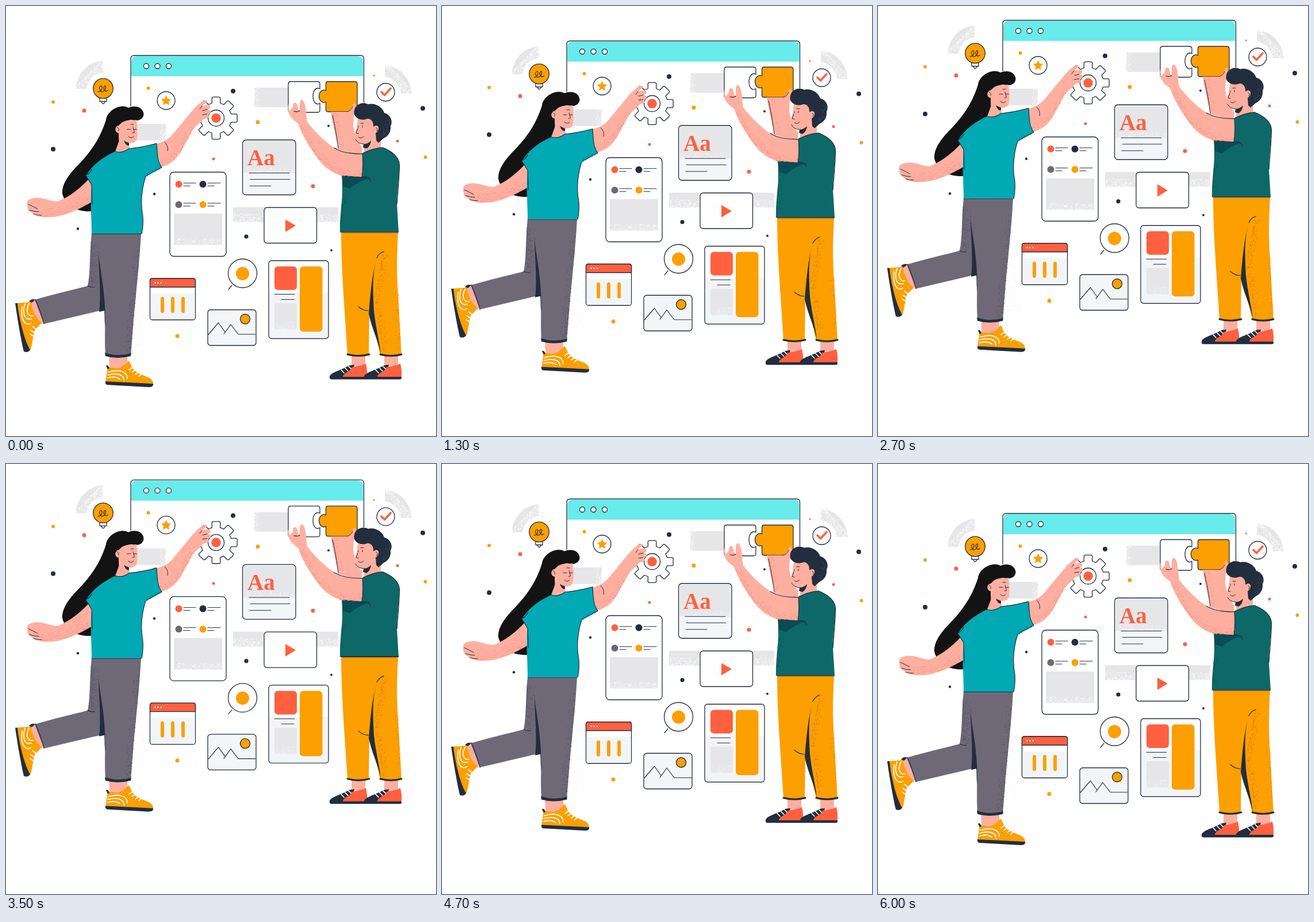
An HTML page for the animation above (6100 ms loop, 748 by 748 pixels).

```html
<!DOCTYPE html>
<html lang="en">
<head>
<meta charset="utf-8">
<title>Building a page together</title>
<style>
html, body { margin: 0; width: 100%; height: 100%; overflow: hidden; background: #fff; }
svg { display: block; width: 100vw; height: 100vh; }
path, rect, circle { stroke-linecap: round; stroke-linejoin: round; }
.ln { fill: none; stroke: #222d3e; stroke-width: 1.2; }
.thin { fill: none; stroke: #222d3e; stroke-width: 1; }
.box { fill: #fff; stroke: #222d3e; stroke-width: 1.3; }
.tint { fill: #f2f6f8; stroke: #222d3e; stroke-width: 1.3; }
.lace { fill: none; stroke: #fff; stroke-width: 1.7; }
.gray { fill: #e6e6e9; }
.pale { fill: #f2f5f8; }
.navy { fill: #222d3e; }
.red { fill: #ff6040; }
.gold { fill: #fc9f00; }
.skin { fill: #ffaf9f; }
.grain { fill: none; stroke-width: 1.1; }
</style>
</head>
<body>
<svg viewBox="0 0 748 748">
<g id="scene">

  <!-- browser window -->
  <path class="box" d="M217 174V92Q217 86 223 86H617Q622.500 86 622.500 92V168"/>
  <path fill="#67ebeb" d="M218 122V96Q219 87 228 87H612Q621 88 621.700 96V122Z"/>
  <g class="box"><circle cx="244" cy="104.500" r="4.500"/><circle cx="263.500" cy="104.500" r="4.500"/><circle cx="283" cy="104.500" r="4.500"/></g>

  <!-- textured backdrops -->
  <path class="gray" d="M168 95C142 98 124 116 121 144H140C142 128 152 118 168 116Z"/>
  <path class="grain" stroke="#fff" data-grain="118 144 167 94 16 260"/>
  <path class="gray" d="M659 103C684 104 704 126 706 152H687C686 138 675 125 659 123Z"/>
  <path class="grain" stroke="#fff" data-grain="663 100 710 152 16 260"/>
  <path class="gray" d="M432 142H492V176H432ZM222 205H278V234H222ZM395 350H578V376H395Z"/>
  <path class="grain" stroke="#fff" data-grain="432 176 432 142 9 60"/>
  <path class="grain" stroke="#fff" data-grain="278 204 278 235 10 60"/>
  <path class="grain" stroke="#fff" data-grain="578 377 395 377 16 620"/>
  <path class="grain" stroke="#ededf0" data-grain="236 500 246 592 20 70"/>
  <path class="grain" stroke="#ededf0" data-grain="588 500 588 592 -12 60"/>

  <!-- bulb, star, check -->
  <path class="box" d="M163 159V166H175V159ZM166 167Q169 173 172 167"/>
  <circle class="gold" cx="169" cy="143.500" r="17.300" stroke="#222d3e" stroke-width="1.300"/>
  <path class="ln" d="M160 149C167 150 169 139 165 139C161 140 163 151 168 149C174 147 175 138 172 139C168 141 171 152 177 147"/>
  <circle class="box" cx="278.500" cy="164.500" r="15.500"/>
  <path id="star" class="gold"/>
  <circle class="box" cx="660.500" cy="150" r="15.500"/>
  <path fill="none" stroke="#ff6040" stroke-width="3.600" stroke-linecap="butt" d="M653 149.500L658.500 155L669 143.500"/>
  <g id="dots"></g>

  <!-- gear -->
  <path id="gear" class="box"/>
  <circle class="box" cx="365.500" cy="195" r="14"/>
  <circle class="red" cx="365.500" cy="195" r="8.300"/>

  <!-- puzzle -->
  <path class="box" d="M495 131.500H542Q546 131.500 546 136V144C538 140 534 149 534 157C534 166 539 174 546 169V181Q546 185 542 185H495Q491 185 491 181V136Q491 131.500 495 131.500Z"/>
  <path class="gold" stroke="#222d3e" stroke-width="1.300" d="M560 131.500H607Q611 131.500 611 136V180Q611 184 607 184H560Q556.500 184 556.500 180V167C550 170 544.500 164 544.500 157C544.500 150 550 144 556.500 147V136Q556.500 131.500 560 131.500Z"/>

  <!-- type card -->
  <rect class="tint" x="411.500" y="233" width="92.500" height="95.500" rx="6"/>
  <path class="gray" d="M413 291V239Q413 235 417 235H499Q502.500 235 502.500 239V291Z"/>
  <path class="grain" stroke="#f7f8fa" data-grain="502 292 413 292 11 200"/>
  <text x="420" y="277" fill="#ff6040" font-family="'Liberation Serif', serif" font-weight="700" font-size="39">Aa</text>
  <path class="thin" d="M423 290.500H493M425 301.500H494M424 313H461"/>

  <!-- list card -->
  <rect class="box" x="285" y="289" width="98" height="146.500" rx="7"/>
  <circle class="red" cx="300.500" cy="310" r="6"/><circle class="navy" cx="342.500" cy="310" r="6"/>
  <circle fill="#6f6977" cx="300.500" cy="345.500" r="6"/><circle class="gold" cx="342.500" cy="345.500" r="6"/>
  <path class="thin" d="M309 308H330M309 313H320M351 308H373M351 313H362M309 343H330M309 348H320M351 343H373M351 348H362"/>
  <rect class="gray" x="292" y="361" width="84" height="55"/>
  <path class="grain" stroke="#fff" data-grain="376 418 292 418 13 260"/>

  <!-- video card -->
  <rect class="box" x="449" y="350.500" width="91.500" height="62" rx="5"/>
  <path class="red" d="M486 371.500L504 382L486 393Z"/>

  <!-- bubble -->
  <circle class="box" cx="411.500" cy="465" r="25"/>
  <circle class="gold" cx="411.500" cy="465.500" r="11.500"/>
  <path class="ln" d="M393 486L387 493"/>

  <!-- calendar -->
  <rect class="box" x="250.500" y="474" width="79" height="72" rx="4"/>
  <rect class="pale" x="252" y="500" width="76.500" height="45" rx="3"/>
  <path class="red" stroke="#222d3e" stroke-width="1.300" d="M250.500 489V478Q250.500 474 255 474H325Q329.500 474 329.500 478V489Z"/>
  <path fill="none" stroke="#fff" stroke-width="2.400" d="M259.500 481.500h.1M264.500 481.500h.1M270 481.500h.1"/>
  <path fill="none" stroke="#fc9f00" stroke-width="6" d="M272 509V531M290 509V531M308 509V531"/>

  <!-- picture -->
  <rect class="tint" x="351" y="528.500" width="84" height="62" rx="5"/>
  <circle class="gold" cx="416" cy="544.500" r="8.500" stroke="#222d3e" stroke-width="1.300"/>
  <path class="ln" d="M352 571.500L369.500 551L381 567M379 570.500L391 554L404 571H434"/>

  <!-- layout card -->
  <rect class="box" x="457" y="443" width="104" height="135.500" rx="5"/>
  <path class="pale" d="M458 498H560V573Q560 577.500 556 577.500H462Q458 577.500 458 573Z"/>
  <rect class="red" x="467" y="453" width="39" height="41" rx="6"/>
  <rect class="gold" x="511" y="453" width="39.500" height="113.500" rx="6"/>
  <path class="thin" d="M467 501.500H502M479 510.500H501"/>
  <rect class="gray" x="467" y="517" width="39" height="46"/>
  <path class="grain" stroke="#f2f5f8" data-grain="506 564 467 564 14 130"/>

  <!-- woman: hair, face -->
  <path fill="#131313" d="M174 198C176 181 200 169 213 177C226 171 239 177 239.500 188C239 198 229 201 218 198C204 199 198 206 196 216L197 250C180 262 160 276 151 300L150 357C128 359 103 350 98 326C97 312 106 297 122 280C148 254 164 230 174 198Z"/>
  <path class="skin" d="M200 204C207 197 220 200 227 198C229 210 229.500 224 227 233C223 239 216 239 213 238L216 252Q203 260 190 253L197 234L196 221C189 221 188 209 196 208Z"/>
  <path class="navy" d="M205 234Q210 237 214 238V243Q208 243 205 234Z"/>
  <path class="thin" d="M211 214.500H217M222 214.500H227M221 211L223.500 220L220 221M213 227Q218 232 222 227M193 211Q197 212 196 217M217 206H222"/>

  <!-- woman: arms -->
  <path class="skin" d="M144 301C128 318 110 332 90 340C78 340 67 334 56 333.500C46 333 37 337 37 341C36 346 38 350 38 354C41 358 45 359 48 362C56 368 71 368 84 367C104 364 122 356 149 341L151 308Z"/>
  <path class="thin" d="M39 345Q48 349 55 353M41 355Q49 358 57 358M48 362Q54 364 62 364"/>
  <path class="grain" stroke="#ee958b" data-grain="62 367 118 357 -13 110"/>
  <path class="grain" stroke="#ee958b" data-grain="118 357 149 341 -20 120"/>
  <path class="skin" d="M258 241C274 237 284 231 291 222L320 187C329 176 337 167 346 164C351 163 351 168 344 171L341 174Q349 171 354 173C358 176 355 179 350 180Q357 181 356 185Q355 188 350 188Q355 191 352 194C347 196 342 196 340 201C333 207 328 211 324 217L307 248C298 266 287 276 270 280Z"/>
  <path class="thin" d="M276 237Q283 243 281 252M341 174L337 179M350 180L342 182M350 188L342 189"/>
  <path class="grain" stroke="#ee958b" data-grain="271 279 303 255 -10 70"/>
  <path class="grain" stroke="#ee958b" data-grain="303 255 327 212 -9 70"/>

  <!-- woman: back shoe -->
  <path class="skin" d="M44 515L57 510L68 547L61 554L49 548Z"/>
  <path class="gold" d="M18 517L44 515C45 530 52 543 61 550C60 557 51 559 49 567L44 594C42 601 38 602 33 600Z"/>
  <path class="navy" d="M16 517L20 517C22 540 31 580 42 598Q38 604 31 601C26 580 20 545 16 517ZM40 514Q45 508 51 511L45 516Z"/>
  <path class="lace" d="M33 518C27 537 34 547 44 544M40 518C33 532 39 541 47 539M28 523C25 545 33 558 43 552M46 557L52 562M43 564L49 568M42 571L47 574"/>

  <!-- woman: front shoe, legs -->
  <path class="skin" d="M179 606H211V626Q195 636 180 627Z"/>
  <path class="gold" d="M177 628C184 628 189 631 195 630C204 627 209 622 213 617C218 620 216 631 230 638C240 645 256 645 256 657L173 655Z"/>
  <path class="navy" d="M173 653L256 657Q257 663 248 663L176 659Q172 658 173 653ZM177 632L174 626Q177 623 180 630Z"/>
  <path class="lace" d="M178 637C194 632 211 634 211 648M177 642C191 638 205 640 205 651M177 647Q189 643 198 649M214 633L221 628M219 637L226 632M225 641L232 636M231 644L237 639"/>
  <path fill="#6f6977" d="M149 396H235C232 450 226 500 222 545L217 608Q195 615 173 606C171 580 173 555 172 528L66 553L50 511C80 502 115 494 142 487C147 465 145 430 149 396Z"/>
  <path class="navy" d="M161 428C163 460 173 490 173 558C171 548 172 540 171 530L162 532C166 500 161 460 161 428Z"/>
  <path class="ln" d="M149 396.500H235M142 487Q149 490 154 489M51 510Q60 530 66 553"/>
  <path class="navy" d="M172 603Q194 611 218 604L217 609Q194 615 173 609Z"/>
  <path class="grain" stroke="#535263" data-grain="148 410 147 486 -14 170"/>
  <path class="grain" stroke="#535263" data-grain="233 420 222 545 10 120"/>
  <path class="grain" stroke="#535263" data-grain="222 545 217 604 12 100"/>

  <!-- woman: shirt -->
  <path fill="#00a9b3" d="M190 253C172 261 151 275 139 295L149 311C146 340 149 370 149 396H236C239 384 238 374 238 366C233 340 237 315 243 296L271 281C263 270 263 255 262 239C245 244 228 246 214 248C206 254 197 255 190 253Z"/>
  <path class="ln" d="M262 239C263 255 263 270 271 281M214 248Q238 246 262 239M270 281L243 296C237 315 233 340 238 366Q239 384 236 396M139 295L149 311L150 345M139 294Q145 292 149 284M190 253Q202 257 214 248"/>
  <path class="grain" stroke="#07808f" data-grain="270 282 243 297 5 40"/>

  <!-- man: far arm, face, hair -->
  <path class="skin" d="M565 184C568 207 574 226 578 249L618 262L620 246Q612 238 610 228L605 212L606 190C611 178 609 168 605 169C601 174 600 183 592 184Z"/>
  <path class="grain" stroke="#ee958b" data-grain="568 186 580 248 -9 80"/>
  <path class="thin" d="M568 190Q575 222 578 248M593 184Q600 183 603 175"/>
  <path fill="#fff" d="M605 190L615 196L610 218L608 226L604 208Z"/>
  <path class="skin" d="M612 194C611 206 610 216 606 225C608 238 616 241 623 240V252L619 258H652V196Z"/>
  <path class="navy" d="M622 240Q630 240 635 234Q634 244 627 248L621 246Z"/>
  <path class="navy" d="M606 189C603 173 618 165 630 171C642 168 655 176 658 186C668 188 674 200 669 209C670 220 664 227 657 230L648 238L644 234L643 221C650 217 650 207 643 208L639 210C640 202 635 196 629 196C620 200 610 197 606 189Z"/>
  <path class="grain" stroke="#414b5d" data-grain="670 198 662 228 10 40"/>
  <path class="thin" d="M613 209V211M620 208V211M612 213L609 221L613 222M613 228Q617 232 622 227M617 204H622M644 212Q648 213 645 218M608 232Q612 240 622 240"/>

  <!-- man: shoes, legs -->
  <path class="skin" d="M601 607H625V626H601ZM658 607H682V626H658Z"/>
  <g id="shoe">
    <path class="navy" d="M563 644C566 637 582 634 598 625L606 624L602 644H628V647Q628 649.500 625 649.500H566Q562 649 563 644Z"/>
    <path class="red" d="M586 644C589 636 598 638 601 629C608 626 617 627 626 622Q629 634 628 645H586Z"/>
    <path class="lace" d="M583 633L588 638M590 630L595 635M596 627L600 631" stroke-width="1.500"/>
  </g>
  <use href="#shoe" x="60"/>
  <path fill="#fc9f00" d="M583 394H682C680 430 679 465 682 500L688 608Q669 612 651 608C646 580 638 555 632 535L631 608Q612 612 594 607C590 540 583 460 583 394Z"/>
  <path class="navy" d="M645 438C637 465 638 495 640 530C643 558 649 580 652 605C645 575 636 560 631 535C634 500 637 465 645 438Z"/>
  <path class="ln" d="M645 438Q649 430 657 427M613 523Q621 530 630 530M583 394H682"/>
  <path fill="none" stroke="#222d3e" stroke-width="3" d="M594 606Q613 611 632 606M651 606Q670 611 688 606"/>
  <path class="grain" stroke="#c9781c" data-grain="656 427 641 510 -10 110"/>
  <path class="grain" stroke="#c9781c" data-grain="641 510 656 600 -10 100"/>
  <path class="grain" stroke="#d5871a" data-grain="682 500 687 600 8 50"/>

  <!-- man: shirt, near arm -->
  <path fill="#0e6868" d="M619 257C630 250 643 247 655 246C672 252 684 263 684.500 277C684 300 680 325 680 345L683 393H581C580 360 588 330 584 296Z"/>
  <path fill="#064d55" d="M585 296H622L634 299C620 302 607 310 598 318L585 313Z"/>
  <path class="skin" d="M491 170C488 184 494 195 508 204C516 226 526 243 540 262C552 280 567 291 585 295L619 298Q622 277 620 257C602 259 584 254 571 247C551 233 537 218 524 202C521 186 523 169 515 163C510 162 511 174 511 182C506 180 509 168 502 168Q499 169 499 176L493 183Z"/>
  <path class="ln" d="M620 257Q622 278 619 298M619 298Q632 296 634 305M585 295L619 298M571 247Q590 258 620 257Q638 247 655 246Q684 258 684.500 277Q684 300 680 345M581 393H683M511 182Q507 185 501 183"/>
  <path class="grain" stroke="#ee958b" data-grain="511 210 540 262 -9 100"/>
  <path class="grain" stroke="#ee958b" data-grain="540 262 580 294 -11 110"/>
  <path class="grain" stroke="#ee958b" data-grain="580 295 619 297 -13 110"/>
  <path class="grain" stroke="#064d55" data-grain="585 313 582 385 -8 50"/>
</g>
</svg>
<script>
const LOOP = 6100, STEP = 100, HALF = 3000, RISE = 63;
const $ = id => document.getElementById(id);
const polar = (cx, cy, r, a) =>
  `${(cx + r * Math.cos(a)).toFixed(1)} ${(cy + r * Math.sin(a)).toFixed(1)}`;

let seed = 7;
const rand = () => (seed = seed * 16807 % 2147483647) / 2147483647;

// Specks along a segment, thinning out to one side of it.
for (const el of document.querySelectorAll("[data-grain]")) {
  const [x1, y1, x2, y2, depth, count] = el.dataset.grain.split(" ").map(Number);
  const len = Math.hypot(x2 - x1, y2 - y1);
  const nx = (y1 - y2) / len, ny = (x2 - x1) / len;
  let d = "";
  for (let i = 0; i < count; i++) {
    const u = rand(), v = depth * rand() ** 1.8;
    d += `M${(x1 + (x2 - x1) * u + nx * v).toFixed(1)} ${(y1 + (y2 - y1) * u + ny * v).toFixed(1)}h.2`;
  }
  el.setAttribute("d", d);
}

const star = Array.from({ length: 10 }, (_, i) =>
  polar(278.5, 165, i % 2 ? 4.6 : 9.3, (i / 5 - 0.5) * Math.PI));
$("star").setAttribute("d", `M${star.join("L")}Z`);

const teeth = [];
for (let i = 0; i < 8; i++) {
  const a = i * Math.PI / 4;
  for (const [r, da] of [[27, -0.27], [36, -0.2], [37, -0.15], [37, 0.15], [36, 0.2], [27, 0.27]])
    teeth.push(polar(365.5, 195, r, a + da));
}
$("gear").setAttribute("d", `M${teeth.join("L")}Z`);

const dots = {
  gold: "82,167,3 247.5,143,3 438,202,3.5 298,574,3.5 729.5,263,3",
  red: "136,182,3.5 361,266,2.5 534,313.5,3.5 640,121,1.5 681,235,2.5",
  navy: "82,249,4 395,148,4 258,327,2.2 125,387.5,2.2 418,401,3.6 566,425,2 561,208.5,2 725,178,4"
};
$("dots").innerHTML = Object.entries(dots).map(([tone, list]) =>
  list.split(" ").map(p => {
    const [x, y, r] = p.split(",");
    return `<circle class="${tone}" cx="${x}" cy="${y}" r="${r}"/>`;
  }).join("")).join("");

const smooth = u => u * u * (3 - 2 * u);
const scene = $("scene"), start = performance.now();
function draw(now) {
  const t = Math.floor(Math.max(0, now - start) % LOOP / STEP) * STEP;
  const y = -RISE * smooth(1 - Math.abs(t - HALF) / HALF);
  scene.setAttribute("transform", `translate(0 ${y.toFixed(2)})`);
  requestAnimationFrame(draw);
}
draw(start);
</script>
</body>
</html>
```
